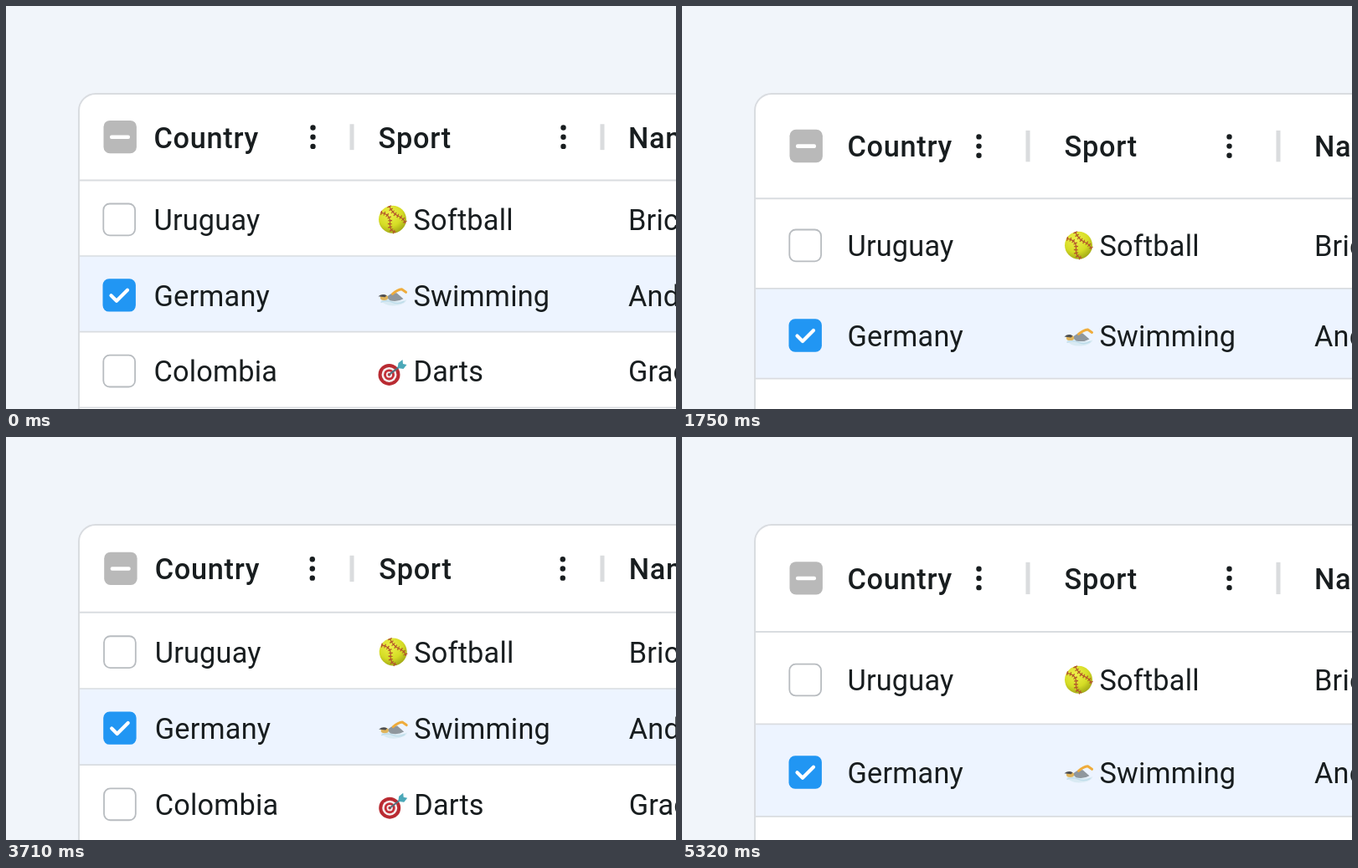
Write an HTML page that moves like this. It is 800 px wide and 482 px high and loops after 6160 ms.

```html
<!DOCTYPE html>
<html lang="en">
<head>
<meta charset="utf-8">
<title>Table spacing</title>
<style>
  html, body { margin: 0; width: 100%; height: 100%; overflow: hidden; background: #f1f5fa; }
  svg { display: block; width: 800px; height: 482px; }
  text { font: 34.3px Roboto, sans-serif; letter-spacing: .2px; fill: #181d1f; }
  .head text { font-weight: 500; letter-spacing: .7px; }
</style>
</head>
<body>
<svg id="stage" viewBox="0 0 800 482">
  <defs>
    <radialGradient id="ball" cx=".4" cy=".3" r=".75">
      <stop offset="0" stop-color="#eef04a"/>
      <stop offset=".6" stop-color="#d5dc25"/>
      <stop offset="1" stop-color="#9ba315"/>
    </radialGradient>
    <clipPath id="frame"><path d="M900 105H107a20 20 0 0 0-20 20V600H900z"/></clipPath>

    <g id="softball">
      <circle r="16.5" fill="url(#ball)"/>
      <g fill="none" stroke="#b3552c">
        <path d="M-14-8Q-2-6-3 4T4 15.5" stroke-width="1.2"/>
        <path d="M-14-8Q-2-6-3 4T4 15.5" stroke-width="5" stroke-dasharray="1.2 2.6"/>
        <path d="M-4-16Q0-7 7-4T15.5 5" stroke-width="1.2"/>
        <path d="M-4-16Q0-7 7-4T15.5 5" stroke-width="5" stroke-dasharray="1.2 2.6"/>
      </g>
    </g>

    <g id="swimming">
      <path d="M-14 5Q-6 1 0 4T17 4Q15 10 3 11T-14 5" fill="#d9eaf3"/>
      <path d="M-7 1Q-2-5 5-4L13 3Q6 7-3 5z" fill="#8f979d"/>
      <path d="M0-3Q6-8 11-8.500L16-5" fill="none" stroke="#efac3c" stroke-width="3" stroke-linejoin="round" stroke-linecap="round"/>
      <ellipse cx="-10" cy="1.5" rx="4.600" ry="3.200" fill="#dfb45c"/>
      <path d="M-17 0Q-12-4-7-1L-9 1z" fill="#4c4d50"/>
      <path d="M-14 7Q-7 4 0 7T14 6" fill="none" stroke="#bddcea" stroke-width="1.4"/>
    </g>

    <g id="darts">
      <circle cx="-4" cy="3" r="13" fill="#b92b32"/>
      <circle cx="-4" cy="3" r="9" fill="#f5eeee"/>
      <circle cx="-4" cy="3" r="6.5" fill="#c42f37"/>
      <circle cx="-4" cy="3" r="3.6" fill="#f5eeee"/>
      <circle cx="-4" cy="3" r="1.8" fill="#c42f37"/>
      <path d="M-4 3L9-7" stroke="#536f7d" stroke-width="2"/>
      <path d="M6-5L7-11L12-15L12.500-10L17-9L13-4z" fill="#4ba8b8"/>
    </g>

    <rect id="off" x="116.300" y="-18.700" width="37.800" height="37.800" rx="7.500" fill="#fff" stroke="#b8bcc0" stroke-width="1.800"/>
    <g id="on">
      <rect x="115.500" y="-19.600" width="39.400" height="39.400" rx="7.500" fill="#2196f3"/>
      <path d="M125.500 .5L132 7L145-6" fill="none" stroke="#fff" stroke-width="4.200" stroke-linecap="round" stroke-linejoin="round"/>
    </g>
    <g id="some">
      <rect x="116.500" y="-19.800" width="39.400" height="39.400" rx="7.500" fill="#b9b9b9"/>
      <rect x="124" y="-2.300" width="24" height="4.600" rx="2" fill="#fff"/>
    </g>
    <g id="menu" fill="#181d1f">
      <circle cy="-11.200" r="3.200"/><circle r="3.200"/><circle cy="11.200" r="3.200"/>
    </g>
  </defs>
  <g clip-path="url(#frame)">
    <path fill="#fff" d="M80 100H800V482H80z"/>
    <g id="table"></g>
  </g>
  <path d="M810 105H107a20 20 0 0 0-20 20V500" fill="none" stroke="#d9dce0" stroke-width="2"/>
</svg>
<script>
const table = document.getElementById('table');

// Parts slide sideways by dx pixels at full spacing.
const part = (dx, body) => `<g data-dx="${dx}">${body}</g>`;
const label = (dx, x, s) => part(dx, `<text x="${x}" y="12.8">${s}</text>`);
const icon = (dx, id, x = 0, y = 0) => part(dx, `<use href="#${id}" x="${x}" y="${y}"/>`);

const rows = [
  ['off', 'Uruguay', 'Softball', 'Brice', 0],
  ['on', 'Germany', 'Swimming', 'Andy', 1.5],
  ['off', 'Colombia', 'Darts', 'Grace', 1.5]
];

table.innerHTML =
  '<rect id="selected" x="87" width="720" fill="#edf4ff"/>' +
  '<g class="head">' +
    icon(12, 'some') + label(21, 176.5, 'Country') + icon(-12, 'menu', 366.5) +
    label(12, 444.5, 'Sport') + icon(-12, 'menu', 665.5) + label(12, 743, 'Name') +
  '</g>' +
  [410.5, 709.5].map(x => `<rect class="sep" x="${x}" width="5" fill="#dadcde"/>`).join('') +
  rows.map(([box, country, sport, name, dy]) => '<g class="row">' +
    icon(12, box) + label(21, 176.5, country) +
    icon(12, sport.toLowerCase(), 461.5, dy) + label(12, 486.5, sport) +
    label(12, 743, name) + '</g>').join('') +
  [2, 1.6, 1.6, 1.6].map(w =>
    `<path class="line" d="M87 0H800" stroke="#d9dce0" stroke-width="${w}"/>`).join('');

const all = s => [...table.querySelectorAll(s)];
const [head] = all('.head'), [selected] = all('#selected');
const seps = all('.sep'), rowGroups = all('.row'), lines = all('.line'), parts = all('[data-dx]');
const shift = (el, x, y) => el.setAttribute('transform', `translate(${x} ${y})`);
const size = (el, y, h) => { el.setAttribute('y', y); el.setAttribute('height', h); };

const LOOP = 6160, STEP = 70;
// Start, end and spacing reached; row heights settle a little after the padding.
const moves = settle => [
  [1050, settle, 1], [2030, 3290, 0], [3640, 4270, .47], [4830, 5320, 1]
];
const padMoves = moves(1750), heightMoves = moves(1870);

function level(list, t) {
  return list.reduce((p, [a, b, to]) => {
    const x = Math.min(1, Math.max(0, (t - a) / (b - a)));
    return p + (to - p) * (1 - (1 - x) ** 1.15);
  }, 0);
}

function draw(t) {
  const pad = level(padMoves, t), v = level(heightMoves, t);
  const headH = 103 + 24.5 * v, rowH = 90.6 + 19.9 * v ** 1.3;
  const top = 105.4 + headH, mid = 105.2 + headH / 2;
  parts.forEach(el => shift(el, el.dataset.dx * pad, 0));
  shift(head, 0, mid);
  seps.forEach(el => size(el, mid - headH * .15, headH * .3));
  rowGroups.forEach((el, i) => shift(el, 0, top + rowH * (i + .5) + 1.5 + .7 * v));
  lines.forEach((el, i) => shift(el, 0, top + rowH * i));
  size(selected, top + rowH, rowH);
}

const start = performance.now();
function tick() {
  const t = (performance.now() - start) % LOOP;
  draw(Math.floor(t / STEP) * STEP);
  requestAnimationFrame(tick);
}
tick();
</script>
</body>
</html>
```
